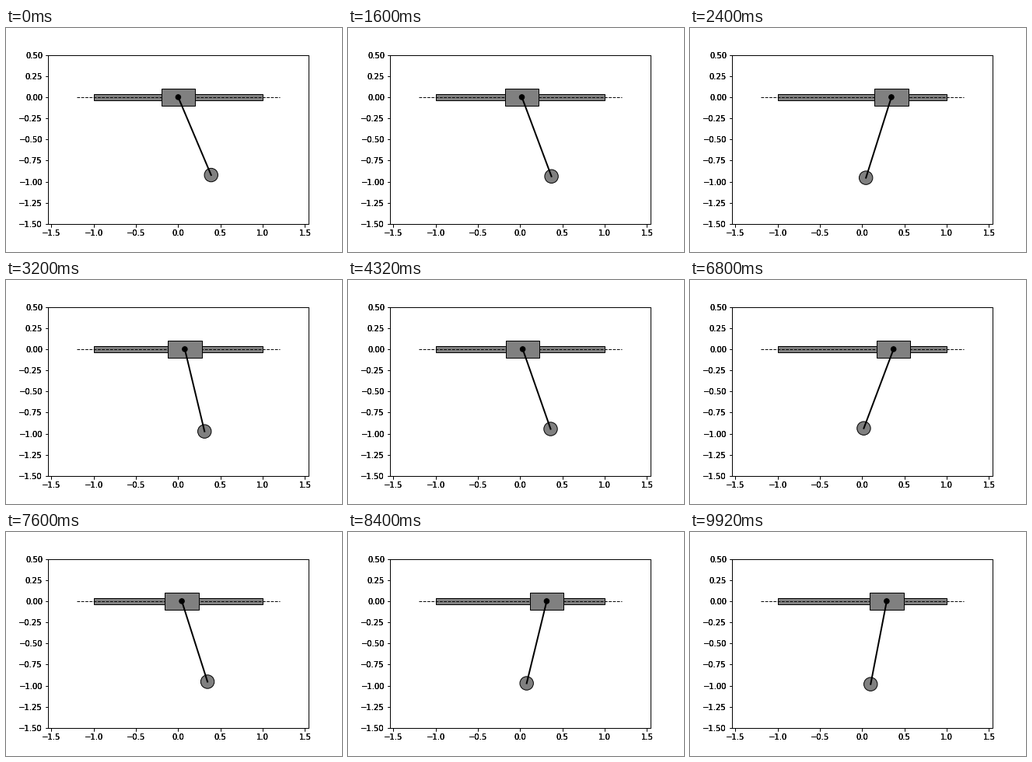
Recreate the animation shown at these times as a matplotlib script. Size 432x288 px, loop 10 s.

```python
import numpy as np
import matplotlib.pyplot as plt
from matplotlib.animation import FuncAnimation
from matplotlib.patches import Circle, Rectangle

FRAMES, STEP_MS = 125, 80
G, LENGTH, CART_MASS, BOB_MASS = 9.81, 1.0, 1.0, 1.0
START_ANGLE = 0.4
CART_W, CART_H, BOB_R = 0.4, 0.2, 0.08
SUBSTEPS = 20

plt.rcParams.update({"font.family": "DejaVu Sans", "font.size": 10})


def rates(state):
    """Angle and angular speed rates of a pendulum on a free cart."""
    a, w = state
    s, c = np.sin(a), np.cos(a)
    total = CART_MASS + BOB_MASS
    accel = -(total * G * s + BOB_MASS * LENGTH * w**2 * s * c)
    return np.array([w, accel / (LENGTH * (CART_MASS + BOB_MASS * s**2))])


def rk4(state, h):
    k1 = rates(state)
    k2 = rates(state + h / 2 * k1)
    k3 = rates(state + h / 2 * k2)
    k4 = rates(state + h * k3)
    return state + h / 6 * (k1 + 2 * k2 + 2 * k3 + k4)


def swing_angles():
    state = np.array([START_ANGLE, 0.0])
    angles = []
    for _ in range(FRAMES):
        angles.append(state[0])
        for _ in range(SUBSTEPS):
            state = rk4(state, STEP_MS / 1000 / SUBSTEPS)
    return np.array(angles)


angles = swing_angles()
# The centre of mass stays put, which fixes the cart's place.
share = BOB_MASS / (BOB_MASS + CART_MASS)
cart_x = share * LENGTH * (np.sin(START_ANGLE) - np.sin(angles))
bob_x = cart_x + LENGTH * np.sin(angles)
bob_y = -LENGTH * np.cos(angles)

fig = plt.figure(figsize=(6, 4), dpi=72, facecolor="white")
box = [0.125, 0.125, 0.775, 0.755]
half_width = box[2] * 6 / (box[3] * 4)
view = dict(xlim=(-half_width, half_width), ylim=(-1.5, 0.5))
ax = fig.add_axes(box, **view)

# Stacked copies of the frame give the heavy tick labels.
for _ in range(2):
    fig.add_axes(box, facecolor="none", **view)

solid = dict(facecolor="0.5", edgecolor="black", linewidth=1)
ax.add_patch(Rectangle((-1, -0.04), 2, 0.08, zorder=1, **solid))
ax.plot([-1.2, 1.2], [0, 0], "k--", lw=1, zorder=2)
cart = ax.add_patch(Rectangle((0, -CART_H / 2), CART_W, CART_H, zorder=3, **solid))
bob = ax.add_patch(Circle((0, 0), BOB_R, zorder=3, **solid))
rod, = ax.plot([], [], "k-", lw=2, zorder=4)
pivot = ax.add_patch(Circle((0, 0), 0.03, color="black", zorder=5))


def update(i):
    x = cart_x[i]
    cart.set_x(x - CART_W / 2)
    pivot.center = x, 0
    bob.center = bob_x[i], bob_y[i]
    rod.set_data([x, bob_x[i]], [0, bob_y[i]])
    return cart, bob, rod, pivot


anim = FuncAnimation(fig, update, frames=FRAMES, interval=STEP_MS,
                     repeat=True, repeat_delay=0)
plt.show()
```
